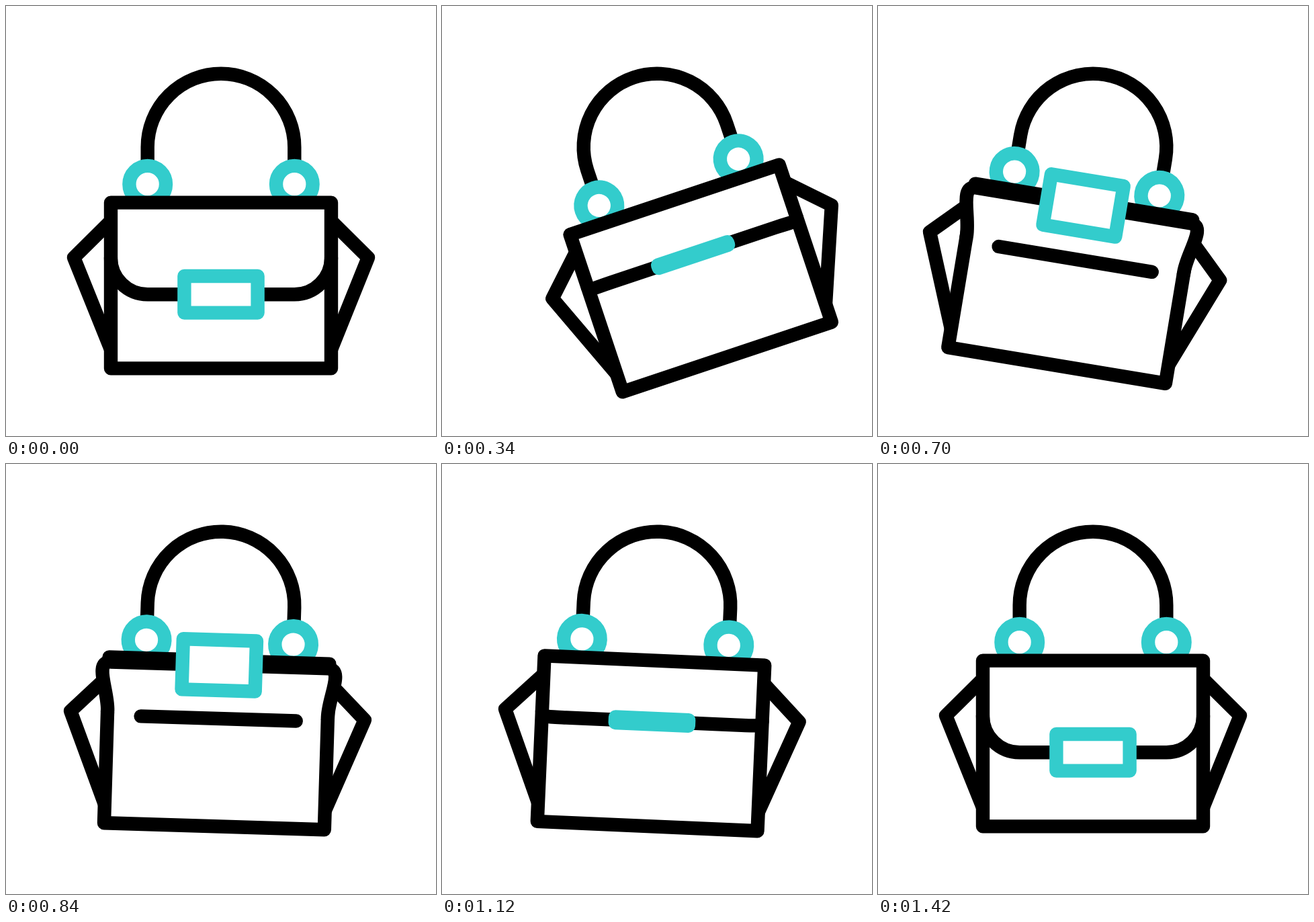
An HTML page with a canvas that plays this animation: 640 by 640 pixels, repeating every 1680 ms.

```html
<!DOCTYPE html>
<html lang="en">
<head>
<meta charset="utf-8">
<title>Swinging handbag</title>
<style>
html, body { margin: 0; width: 100%; height: 100%; overflow: hidden; background: #fff; }
canvas { display: block; width: 640px; height: 640px; }
</style>
</head>
<body>
<canvas id="stage" width="640" height="640"></canvas>
<script>
const ctx = document.getElementById('stage').getContext('2d');
const LOOP = 1680;
const BLACK = '#000', TEAL = '#33cccc', WHITE = '#fff';
const LINE = 20.4;
const PIVOT_Y = 210;

const mix = (a, b, k) => a + (b - a) * k;
const clamp = x => Math.min(1, Math.max(0, x));
const smooth = x => x * x * (3 - 2 * x);
const cubic = x => x < 0.5 ? 4 * x ** 3 : 1 - 4 * (1 - x) ** 3;
const rush = x => x ** 2.77;

// Each key: time, value, easing used to reach it
function track(keys, t) {
  for (let i = 1; i < keys.length; i++) {
    const [t0, v0] = keys[i - 1], [t1, v1, ease] = keys[i];
    if (t < t1) return mix(v0, v1, ease(clamp((t - t0) / (t1 - t0))));
  }
  return keys[keys.length - 1][1];
}

const SWING = [[0, 0], [376, -24.2, rush], [728, 10, smooth], [940, -5, smooth],
               [1120, 2.5, smooth], [1312, 0, smooth]];
const FLAP = [[0, 0], [747, 1, cubic], [1420, 0, cubic]];
const POCKET_END = [[373, 0], [615, 1, smooth]];
const POCKET_START = [[870, 0], [1110, 1, smooth]];

function draw(build, stroke, fill) {
  ctx.beginPath();
  build();
  if (fill) {
    ctx.fillStyle = fill;
    ctx.fill();
  }
  ctx.strokeStyle = stroke;
  ctx.stroke();
}

function polyline(...points) {
  points.forEach(([x, y]) => ctx.lineTo(x, y));
}

function handle() {
  ctx.moveTo(-109.3, 55);
  ctx.lineTo(-109.3, 0);
  ctx.arc(0, 0, 109.3, Math.PI, 0);
  ctx.lineTo(109.3, 55);
}

// m runs from 0 (closed) to 1 (folded up)
function flapPath(m) {
  const y = mix(219.3, 88, m);
  const c1x = mix(164, 162, m), c1y = mix(194.9, 135, m);
  const c2x = mix(139.5, 188, m) + 45 * m * m * (1 - m);
  const endX = mix(109.3, 162, m);
  ctx.moveTo(-164, 164.7);
  ctx.bezierCurveTo(-c1x, c1y, -c2x, y, -endX, y);
  ctx.lineTo(endX, y);
  ctx.bezierCurveTo(c2x, y, c1x, c1y, 164, 164.7);
}

function render(t) {
  ctx.setTransform(1, 0, 0, 1, 0, 0);
  ctx.fillStyle = WHITE;
  ctx.fillRect(0, 0, 640, 640);
  ctx.translate(320, PIVOT_Y);
  ctx.rotate(track(SWING, t) * Math.PI / 180);
  ctx.lineWidth = LINE;
  ctx.lineCap = ctx.lineJoin = 'round';

  draw(handle, BLACK);
  for (const side of [-1, 1]) {
    draw(() => ctx.arc(side * 109.3, 55.2, 27.3, 0, 7), TEAL, WHITE);
    draw(() => polyline([side * 164, 110], [side * 219, 164.5], [side * 164, 301.3]), BLACK);
  }
  draw(() => ctx.rect(-164, 82.6, 328, 246.8), BLACK, WHITE);

  const m = track(FLAP, t);
  draw(() => flapPath(m), BLACK, WHITE);

  const from = track(POCKET_START, t), to = track(POCKET_END, t);
  if (to > from) {
    draw(() => polyline([mix(-114.3, 117, from), 169], [mix(-114.3, 117, to), 169]), BLACK);
  }

  const half = Math.abs(mix(27.3, -38.3, m));
  const buckleY = mix(219.3, 88, m);
  draw(() => ctx.rect(-54.6, buckleY - half, 109.2, 2 * half), TEAL, WHITE);
}

const start = performance.now();
function tick() {
  render((performance.now() - start) % LOOP);
  requestAnimationFrame(tick);
}
tick();
</script>
</body>
</html>
```
